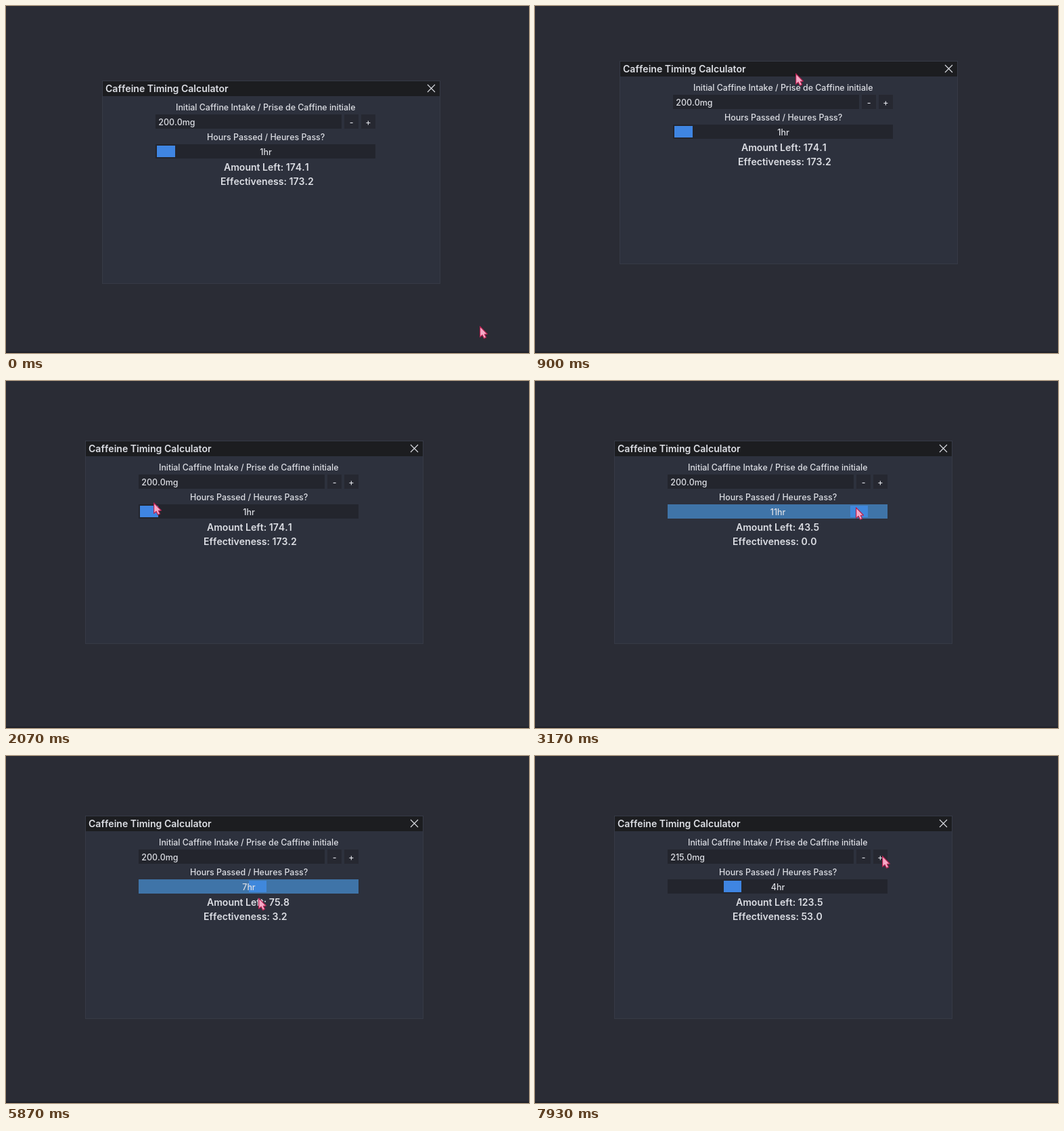
Write an HTML page with a canvas that moves like this. It is 773 by 512 pixels and loops after 8 s.

```html
<!DOCTYPE html>
<html lang="en">
<head>
<meta charset="utf-8">
<title>Caffeine Timing Calculator</title>
<style>
html, body { margin: 0; width: 100%; height: 100%; overflow: hidden; background: #2a2c35; }
canvas { display: block; }
</style>
</head>
<body>
<canvas id="stage" width="773" height="512"></canvas>
<script>
const ctx = document.getElementById('stage').getContext('2d');
const LOOP = 8000, TICK = 100 / 3;
const DRAG_START = 540, DRAG_END = 1380;
const PRESS = 2260, RELEASE = 6170, HOLD = 7200;
const GRIP = { x: 260, y: 18 };
const SLIDER = { x: 79, y: 94, w: 325, h: 21 };
const STEP = 321 / 12;
const BODY = '500 12.4px Inter, sans-serif';
const BOLD = '600 14.05px Inter, sans-serif';
const C = {
  bg: '#2a2c35', edge: '#20222a', win: '#2d313d', border: '#363a46', title: '#1c1d20',
  frame: '#23252d', button: '#262831', hot: '#3f74a8', grab: '#3f85e2', grabOn: '#4088dc',
  text: '#dcdee4'
};

// Pointer stops: arrival time, x, y, rest before leaving
const STOPS = [
  [0, 700, 472], [430, 402, 128, 110],
  [720, 489, 138], [900, 385, 99], [1050, 450, 83], [1200, 433, 103], [1380, 377, 106],
  [2130, 215, 180, 70], [2290, 213, 188], [3170, 474, 186, 270],
  [4575, 266, 205], [5230, 520, 206, 210], [6150, 293, 210],
  [6800, 523, 150], [6930, 513, 147]
];

const clamp = (v, lo, hi) => Math.max(lo, Math.min(hi, v));
const ease = u => u * u * (3 - 2 * u);

function pointer(t) {
  const i = Math.max(1, STOPS.findIndex(s => s[0] > t));
  const last = STOPS[STOPS.length - 1];
  if (t >= last[0]) return { x: last[1], y: last[2] };
  const [t0, x0, y0, rest = 0] = STOPS[i - 1];
  const [t1, x1, y1] = STOPS[i];
  const k = ease(clamp((t - t0 - rest) / (t1 - t0 - rest), 0, 1));
  return { x: Math.round(x0 + (x1 - x0) * k), y: Math.round(y0 + (y1 - y0) * k) };
}

function windowAt(t) {
  const p = pointer(clamp(t, DRAG_START, DRAG_END));
  return { x: p.x - GRIP.x, y: p.y - GRIP.y };
}

function hoursAt(t, win) {
  if (t < PRESS) return 1;
  const x = pointer(Math.min(t, RELEASE)).x - win.x - SLIDER.x - 2 - STEP / 2;
  return clamp(1 + Math.round(x / STEP), 1, 12);
}

const amountLeft = (mg, h) => mg * Math.pow(0.5, h / 5);

function effectiveness(mg, h) {
  const l = Math.log(h);
  return mg * Math.exp(-Math.exp(-1.9386 + 1.6412 * l + 0.15 * l * (l - Math.log(4))));
}

function box(x, y, w, h, color) {
  ctx.fillStyle = color;
  ctx.fillRect(x, y, w, h);
}

function text(str, x, y, font = BODY, align = 'left') {
  ctx.font = font;
  ctx.fontKerning = 'none';
  ctx.textAlign = align;
  ctx.fillStyle = C.text;
  ctx.fillText(str, x, y);
}

function button(label, x, hot) {
  box(x, 50, 21, 21, hot ? C.hot : C.button);
  text(label, x + 10.5, 66, BODY, 'center');
}

function slider(hours, hot, active) {
  const x = SLIDER.x + 2 + (hours - 1) * STEP;
  const left = Math.ceil(x), right = Math.round(x + STEP);
  box(SLIDER.x, SLIDER.y, SLIDER.w, SLIDER.h, hot ? C.hot : C.frame);
  box(left, SLIDER.y + 2, right - left, 17, active ? C.grabOn : C.grab);
  text(hours + 'hr', 242, 110, BODY, 'center');
}

function closeIcon(x, y, r) {
  ctx.strokeStyle = C.text;
  ctx.lineWidth = 1.1;
  ctx.beginPath();
  for (const s of [-1, 1]) {
    ctx.moveTo(x - r, y - s * r);
    ctx.lineTo(x + r, y + s * r);
  }
  ctx.stroke();
}

function drawPointer(p) {
  ctx.save();
  ctx.translate(p.x + 0.6, p.y + 0.8);
  ctx.beginPath();
  [[0, 0], [0, 15.6], [3.5, 12.6], [6, 17.6], [9, 16.2], [6.8, 11.6], [10.8, 11.2]]
    .forEach(([x, y]) => ctx.lineTo(x, y));
  ctx.closePath();
  ctx.fillStyle = '#f6a8c6';
  ctx.fill();
  ctx.strokeStyle = '#b3204f';
  ctx.lineWidth = 1.2;
  ctx.lineJoin = 'round';
  ctx.stroke();
  ctx.restore();
}

function draw(t) {
  const p = pointer(t), win = windowAt(t);
  const hours = hoursAt(t, win);
  const mg = t < HOLD ? 200 : 201 + Math.floor((t - HOLD) / 50);
  const over = (x, y, w, h) => {
    const mx = p.x - win.x, my = p.y - win.y;
    return mx >= x && mx < x + w && my >= y && my < y + h;
  };
  const active = t >= PRESS && t < RELEASE;
  const sliderHot = active || over(SLIDER.x, SLIDER.y, SLIDER.w, SLIDER.h);

  box(0, 0, 773, 512, C.bg);
  box(0, 510, 773, 2, C.edge);

  ctx.save();
  ctx.translate(win.x, win.y);
  box(0, 0, 500, 300, C.border);
  box(1, 1, 498, 298, C.win);
  box(1, 1, 498, 22, C.title);
  text('Caffeine Timing Calculator', 5, 17, BOLD);
  closeIcon(486.5, 11.5, 5.5);

  text('Initial Caffine Intake / Prise de Caffine initiale', 109, 44);
  box(79, 50, 275, 21, C.frame);
  text(mg.toFixed(1) + 'mg', 83.3, 66);
  for (const [label, x] of [['-', 358], ['+', 383]]) {
    button(label, x, t < HOLD && over(x, 50, 21, 21));
  }

  text('Hours Passed / Heures Pass?', 155, 88);
  slider(hours, sliderHot, active);

  text('Amount Left: ' + amountLeft(mg, hours).toFixed(1), 180, 133, BOLD);
  text('Effectiveness: ' + effectiveness(mg, hours).toFixed(1), 175, 154, BOLD);
  ctx.restore();

  drawPointer(p);
}

const start = performance.now();
function tick() {
  const t = (performance.now() - start) % LOOP;
  draw(Math.floor((t + 5) / TICK) * TICK);
  requestAnimationFrame(tick);
}
tick();
</script>
</body>
</html>
```
